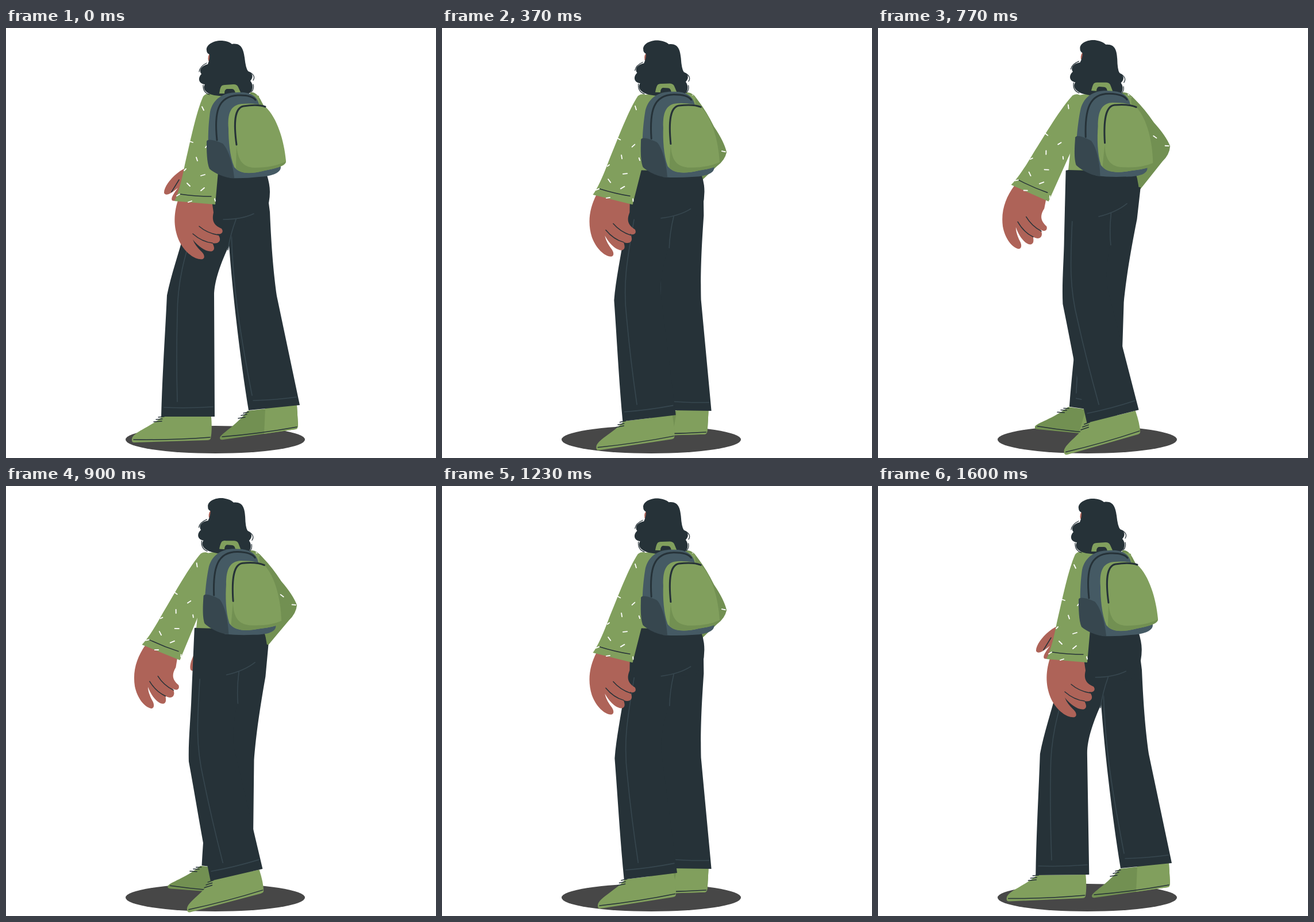
Recreate the animation shown at these times as an HTML page. Size 748 px wide and 748 px high, loop 1660 ms.

```html
<!DOCTYPE html>
<html lang="en">
<head>
<meta charset="utf-8">
<title>Walking figure with backpack</title>
<style>
  html, body { margin: 0; width: 100%; height: 100%; overflow: hidden; background: #fff; }
  svg { display: block; width: 100vw; height: 100vh; }
  .green { fill: #819f5d; }
  .shade { fill: #729052; }
  .skin { fill: #ae6358; }
  .navy { fill: #263238; }
  .slate { fill: #37474f; }
  .steel { fill: #455a64; }
  .line { fill: none; stroke: #263238; stroke-width: 1.5; stroke-linecap: round; }
  .zip { fill: none; stroke: #263238; stroke-width: 3; stroke-linecap: round; }
  .seam { fill: none; stroke: #37474f; stroke-width: 1.6; stroke-linecap: round; }
  .fleck { fill: none; stroke: #fff; stroke-width: 1.8; stroke-linecap: round; }
</style>
</head>
<body>
<svg viewBox="0 0 748 748">
  <ellipse cx="364" cy="716" rx="156" ry="24" fill="#474747"/>

  <g id="farArm">
    <path class="skin" d="M312 244C296 250 274 274 275 287C278 293 286 289 299 278C292 288 286 296 289 300C294 303 302 297 312 290Z"/>
    <path class="line" d="M301 264L288 285"/>
    <path class="shade" d="M425 112Q436 110 445 129Q457 150 466 177Q480 205 482 224Q477 238 462 246L412 282L395 246Z"/>
    <path class="fleck" d="M474 221l6 2M459 199l4 5M436 118l3 6"/>
  </g>

  <g id="farLeg">
    <path class="shade" d="M372 713C373 706 400 692 420 666L506 656L508 690Q508 697 504 698L378 716Q372 717 372 713Z"/>
    <path class="green" d="M451 661L506 656L508 690Q508 697 504 698L449 706Z"/>
    <path class="line" d="M376 711Q440 706 506 694M404 679l12-2M409 674l10-2M413 670l9-2"/>
    <path class="navy" d="M372 265H452L459 320C462 390 466 430 471 466L511 656L422 665C408 580 395 470 388 378Z"/>
    <path class="seam" d="M392 356C395 450 405 520 428 639M430 648Q470 647 505 642"/>
  </g>

  <g id="nearLeg">
    <path class="green" d="M219 715C221 703 250 695 272 676H357Q359 700 356 714Q355 717 350 717L223 721Q218 721 219 715Z"/>
    <path class="line" d="M222 716Q290 717 355 712M257 685l14-1M261 681l11-1M265 677l10-1"/>
    <path class="navy" d="M342 241L452 250Q459 270 459 285Q459 303 452 322L436 340L400 334L389 376C374 408 362 440 362 466L363 676H270C272 600 277 530 280 465C287 430 301 390 310 356Q320 320 342 241Z"/>
    <path class="seam" d="M331 330C310 400 298 440 298 500Q296 570 298 650M275 660Q315 662 360 659M378 333Q410 333 431 323M400 333Q390 360 386 386"/>
  </g>

  <path class="green" d="M345 118Q390 108 440 118L448 250L331 247Z"/>

  <g id="nearArm">
    <path class="skin" d="M299 300C291 325 291 350 303 374C313 392 330 404 342 402C347 400 345 393 339 388C333 382 328 376 325 368C335 381 350 391 359 388C364 385 362 380 359 374C368 376 373 372 372 366Q371 361 367 358C376 360 379 354 375 349C364 344 357 338 361 321L358 300Z"/>
    <path class="line" d="M325 358Q341 372 359 374M336 345Q350 357 369 360"/>
    <path class="green" d="M343 119Q350 111 360 116Q376 150 373 205L364 307L293 301C301 285 307 258 311 238C320 200 331 145 343 119Z"/>
    <path class="line" d="M303 289Q330 293 357 293"/>
    <path class="fleck" d="M341 137l3 6M319 197l6 2M351 203l-4 5M331 225l2 6M362 225l2 4M313 245l-3 3M339 257l7-2M315 270l5 5M345 278l-6 5M297 292l5-3M317 303l6-2M363 297l1 4"/>
  </g>

  <g id="head">
    <path class="skin" d="M356 43Q350 48 352 57L360 62Z"/>
    <path class="navy" d="M349 39C347 29 362 21 376 22Q388 23 393 28C409 25 413 37 415 51Q417 70 421 75C432 80 429 88 425 92C432 100 429 112 422 114Q395 122 362 117C347 114 341 105 346 98C335 97 333 87 340 80C334 72 342 65 351 63Q355 53 354 46Q349 44 349 39Z"/>
    <path class="line" style="stroke-width:1.2" d="M336 76Q337 67 349 61M343 99Q342 112 354 116M424 77Q435 83 430 91M430 98Q432 106 427 111"/>
  </g>

  <g id="bag">
    <path class="green" d="M371 114C373 102 374 99 381 99L396 98Q402 98 404 103L409 114Z"/>
    <path class="navy" d="M380 114Q380 107 384 106L393 106Q398 106 399 114Z"/>
    <path class="steel" d="M353 230C350 190 353 160 355 146C360 123 378 112 402 112Q434 110 440 132L478 242C478 253 460 258 440 259Q415 262 390 261Z"/>
    <path class="zip" d="M367 195C362 147 368 119 403 117Q427 116 434 125"/>
    <path class="slate" d="M349 197C352 191 368 197 377 201C387 211 395 238 397 261C383 262 363 253 354 245C349 234 349 212 349 197Z"/>
    <path class="green" d="M387 175C385 148 391 134 410 132Q438 130 451 137C472 156 484 197 487 231C487 240 470 244 450 248C424 255 406 253 397 242C389 222 387 195 387 175Z"/>
    <path class="shade" d="M401 204C403 229 411 242 432 243Q465 243 487 232C487 240 470 244 450 248C424 255 406 253 400 244Z"/>
    <path class="zip" d="M401 203C396 166 397 139 413 136Q438 132 451 137"/>
  </g>
</svg>
<script>
const LOOP = 1660, STEP = 100 / 3, HALF = 24;

// Full swing in degrees and pivot of every rigid part
const joints = {
  farArm: [-16.4, 428, 120],
  farLeg: [14.3, 403, 291],
  nearLeg: [-14.8, 361, 306],
  nearArm: [20, 346, 105],
  head: [5.2, 385, 66],
  bag: [4.3, 440, 112]
};
const parts = Object.keys(joints).map(id => [document.getElementById(id), ...joints[id]]);

function draw(time) {
  const step = Math.min(2 * HALF, Math.floor((time % LOOP + 3.5) / STEP));
  const swing = 1 - Math.abs(step / HALF - 1);
  // The near leg does not swing quite all the way back
  const nearSwing = step > HALF ? 0.045 + 0.955 * swing : swing;
  for (const [el, angle, x, y] of parts) {
    const amount = el.id === "nearLeg" ? nearSwing : swing;
    el.setAttribute("transform", `rotate(${angle * amount} ${x} ${y})`);
  }
}

const start = performance.now();
function tick() {
  draw(performance.now() - start);
  requestAnimationFrame(tick);
}
tick();
</script>
</body>
</html>
```
